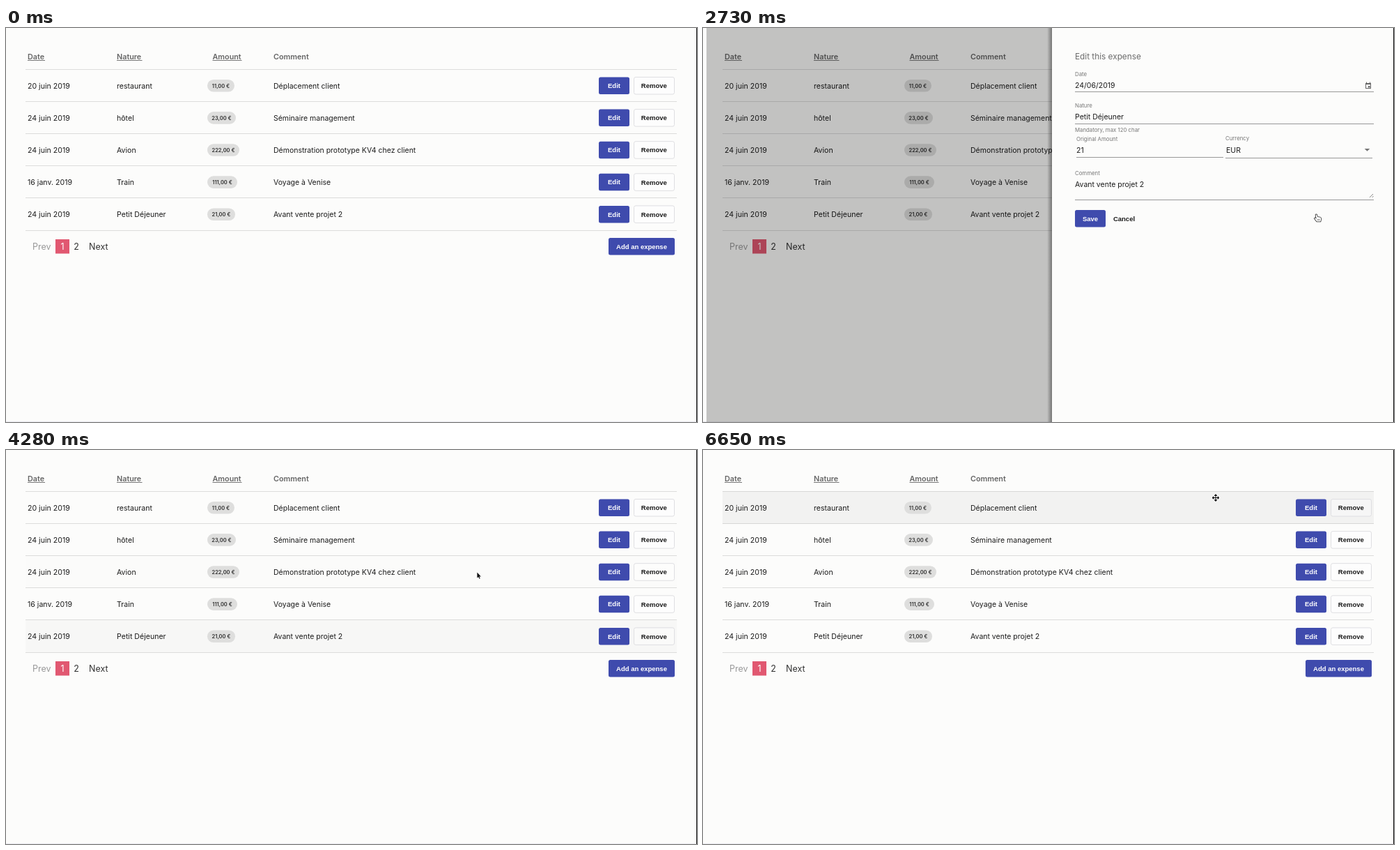
An HTML page with a canvas that plays this animation: 992 by 565 pixels, repeating every 6.7 s.

```html
<!DOCTYPE html>
<html lang="fr">
<head>
<meta charset="utf-8">
<title>Expenses</title>
<style>
html, body { margin: 0; width: 100%; height: 100%; overflow: hidden; background: #fcfcfb; }
canvas { display: block; }
</style>
</head>
<body>
<canvas id="stage" width="992" height="565"></canvas>
<script>
const ctx = document.getElementById('stage').getContext('2d');
const LOOP = 6700, PAPER = '#fcfcfb', BLUE = '#3f4bad', INK = '#1c1c1c';
const UI = 'Inter, sans-serif', BUTTON = '"Liberation Sans", Arial, sans-serif';
const ROW_TOP = 59.5, ROW_STEP = 46.1;

const ROWS = [
  ['20 juin 2019', 'restaurant', '11,00 €', 39, 'Déplacement client'],
  ['24 juin 2019', 'hôtel', '23,00 €', 41, 'Séminaire management'],
  ['24 juin 2019', 'Avion', '222,00 €', 46, 'Démonstration prototype KV4 chez client'],
  ['16 janv. 2019', 'Train', '111,00 €', 43, 'Voyage à Venise'],
  ['24 juin 2019', 'Petit Déjeuner', '21,00 €', 40, 'Avant vente projet 2']
];
// row, pointer enters, pointer leaves
const HOVERS = [[4, 900, 2450], [4, 3950, 4220], [2, 4270, 4330], [1, 4330, 4420], [0, 4420, 4560], [0, 6530, 6800]];
// time, x, y
const PATH = [
  [350, 935, 575], [610, 930, 342], [800, 930, 342], [1100, 892, 290], [1440, 880, 266],
  [2350, 880, 266], [2500, 881, 267], [2900, 881, 267], [3230, 745, 284], [3400, 745, 284],
  [3580, 616, 277], [3950, 616, 277], [4280, 676, 176], [4430, 735, 100], [4480, 740, 94],
  [4660, 792, 8], [4880, 795, 4], [4980, 798, -1], [6410, 798, -1], [6650, 736, 68.5]
];
// each shape holds from its time on
const SHAPES = [[350, arrow], [870, hand], [2830, arrow], [3550, hand], [3930, arrow], [6550, cross]];

const clamp = v => Math.max(0, Math.min(1, v));
const ramp = (t, start, length) => clamp((t - start) / length);
const easeOut = (p, power) => 1 - (1 - p) ** power;

function text(str, x, cy, size, color = INK, weight = 400, family = UI, align = 'left') {
  ctx.font = `${weight} ${size}px ${family}`;
  ctx.fillStyle = color;
  ctx.textAlign = align;
  ctx.fillText(str, x, cy + size * 0.36);
}

function rect(x, y, w, h, color) {
  ctx.fillStyle = color;
  ctx.fillRect(x, y, w, h);
}

function round(x, y, w, h, r, fill, stroke) {
  ctx.beginPath();
  ctx.roundRect(x, y, w, h, r);
  ctx.fillStyle = fill;
  ctx.fill();
  if (stroke) {
    ctx.lineWidth = 1;
    ctx.strokeStyle = stroke;
    ctx.stroke();
  }
}

function button(label, x, y, w, fill = BLUE, color = '#fff') {
  round(x, y, w, 24.5, 2.5, fill);
  text(label, x + w / 2, y + 12.2, 9.5, color, 700, BUTTON, 'center');
}

function ripple(t, start, bx, by, bw, cx, cy, reach, rgb) {
  const alpha = 0.1 * (1 - ramp(t, start + 300, 300));
  if (t < start || !alpha) return;
  ctx.save();
  ctx.beginPath();
  ctx.roundRect(bx, by, bw, 24.5, 2.5);
  ctx.clip();
  ctx.beginPath();
  ctx.arc(cx, cy, reach * easeOut(ramp(t, start, 225), 2), 0, 7);
  ctx.fillStyle = `rgba(${rgb},${alpha})`;
  ctx.fill();
  ctx.restore();
}

function table(t) {
  for (const [label, x, w] of [['Date', 31, 25], ['Nature', 159, 36.5], ['Amount', 296.5, 42], ['Comment', 384]]) {
    text(label, x, 41, 10.8, '#666', 600);
    if (w) rect(x, 46, w, 1, '#777');
  }
  for (const [row, on, off] of HOVERS) {
    const level = ramp(t, on, 100) * (1 - ramp(t, off, 120));
    rect(28, ROW_TOP + row * ROW_STEP, 935, ROW_STEP, `rgba(0,0,0,${0.04 * level})`);
  }
  for (let i = 0; i <= ROWS.length; i++) rect(28, Math.round(ROW_TOP - 0.5 + i * ROW_STEP), 935, 1, 'rgba(0,0,0,.13)');
  ROWS.forEach(([date, nature, amount, chip, comment], i) => {
    const cy = 82.8 + i * ROW_STEP;
    text(date, 31, cy, 10.6);
    text(nature, 159, cy, 10.6);
    round(289, cy - 8.8, chip, 17.6, 8.8, '#dededd');
    text(amount, 289 + chip / 2, cy + 0.2, 7.5, '#333', 600, UI, 'center');
    text(comment, 384, cy, 10.5);
    button('Edit', 851, cy - 12.3, 44);
    round(901.5, cy - 12.3, 58, 24.5, 2.5, 'rgba(255,255,255,.3)', '#dfdfe2');
    text('Remove', 930.3, cy, 9.5, INK, 700, BUTTON, 'center');
  });
  ripple(t, 2250, 851, 254.8, 44, 880, 267, 32, '255,255,255');
  text('Prev', 38, 313.2, 12.5, '#999');
  rect(71, 303, 20, 20.5, '#e15871');
  text('1', 81, 313.2, 12.5, '#fff', 400, UI, 'center');
  text('2', 101, 313.2, 12.5, '#333', 400, UI, 'center');
  text('Next', 119, 313.2, 12.5, '#333');
  button('Add an expense', 865, 301, 95);
}

function field(label, value, x, labelY, valueY, lineY, w) {
  text(label, x, labelY, 7.8, '#777');
  text(value, x + (label === 'Currency' ? 1 : 0), valueY, 10.5);
  rect(x, lineY, w, 1, '#989898');
}

function panel(t) {
  const shadow = ctx.createLinearGradient(494, 0, 501, 0);
  shadow.addColorStop(0, 'rgba(0,0,0,0)');
  shadow.addColorStop(1, 'rgba(0,0,0,.4)');
  rect(494, 0, 7, 565, shadow);
  rect(501, 0, 491, 565, PAPER);
  text('Edit this expense', 534, 40.5, 11.8, '#6b6b6b');
  field('Date', '24/06/2019', 534, 66, 82, 91, 429);
  field('Nature', 'Petit Déjeuner', 534, 111.3, 127.3, 137, 429);
  text('Mandatory, max 120 char', 534, 146, 7.8, '#777');
  field('Original Amount', '21', 536, 159.5, 175, 185, 211);
  field('Currency', 'EUR', 750, 158.3, 175, 186, 211);
  field('Comment', 'Avant vente projet 2', 534, 208.3, 224.3, 246, 429);

  // calendar, select triangle, resize grip
  ctx.lineWidth = 1;
  ctx.strokeStyle = '#666';
  ctx.strokeRect(951.5, 79.5, 7, 7);
  rect(951, 79, 8, 2, '#666');
  rect(952, 77.5, 1, 2, '#666');
  rect(957, 77.5, 1, 2, '#666');
  rect(955, 83, 2.5, 2.5, '#666');
  ctx.beginPath();
  ctx.moveTo(949.7, 173);
  ctx.lineTo(957.3, 173);
  ctx.lineTo(953.5, 176.7);
  ctx.fillStyle = '#757575';
  ctx.fill();
  ctx.beginPath();
  ctx.moveTo(957, 243);
  ctx.lineTo(962, 238);
  ctx.moveTo(960.5, 243);
  ctx.lineTo(962.5, 241);
  ctx.strokeStyle = '#888';
  ctx.stroke();

  button('Save', 534, 261, 44);
  ripple(t, 3794, 578, 261, 53, 616, 275, 41, '0,0,0');
  text('Cancel', 604.5, 273.2, 9.5, INK, 700, BUTTON, 'center');
}

function outline(d, fill, stroke, width) {
  const shape = new Path2D(d);
  ctx.lineJoin = 'round';
  ctx.lineWidth = width;
  ctx.strokeStyle = stroke;
  ctx.stroke(shape);
  ctx.fillStyle = fill;
  ctx.fill(shape);
}

function arrow() {
  outline('M0 0V8L1.8 6.4L3.1 9.3L4.3 8.8L3 6H5.5Z', '#111', '#fff', 1.4);
}

function hand() {
  outline('M-1.5 .8Q-.7-.3.2.8L1.2 4L5 4.6Q6.4 5 6.2 7L5.5 10.5H.2L-3 6.6Q-3.3 5.2-2 5.4L-.4 6.5Z', '#fff', '#222', 1.5);
  outline('M1.7 7V9M3.5 7V9', 'transparent', '#333', 0.7);
}

function cross() {
  const d = 'M-3.5 0H3.5M0-3.5V3.5M-5 0L-3-1.7V1.7ZM5 0L3-1.7V1.7ZM0-5L-1.7-3H1.7ZM0 5L-1.7 3H1.7Z';
  outline(d, '#fff', '#fff', 2.4);
  outline(d, '#111', '#111', 1);
}

function pointer(t) {
  if (t < PATH[0][0]) return;
  const next = PATH.findIndex(p => p[0] > t);
  const b = next < 0 ? PATH.at(-1) : PATH[next];
  const a = next < 0 ? b : PATH[next - 1];
  const p = a === b ? 0 : ramp(t, a[0], b[0] - a[0]);
  ctx.save();
  ctx.translate(a[1] + (b[1] - a[1]) * p, a[2] + (b[2] - a[2]) * p);
  SHAPES.findLast(s => s[0] <= t)[1]();
  ctx.restore();
}

function draw(t) {
  rect(0, 0, 992, 565, PAPER);
  rect(0, 564, 992, 1, '#ececf2');
  table(t);
  const open = easeOut(ramp(t, 2350, 400), 4) - easeOut(ramp(t, 3860, 400), 4);
  if (open > 0) {
    rect(5, 0, 986, 565, `rgba(0,0,0,${0.23 * open})`);
    ctx.save();
    ctx.translate(498 * (1 - open), 0);
    panel(t);
    ctx.restore();
  }
  rect(991, 0, 1, 565, '#111');
  pointer(t);
}

function tick() {
  draw(performance.now() % LOOP);
  requestAnimationFrame(tick);
}
tick();
</script>
</body>
</html>
```
